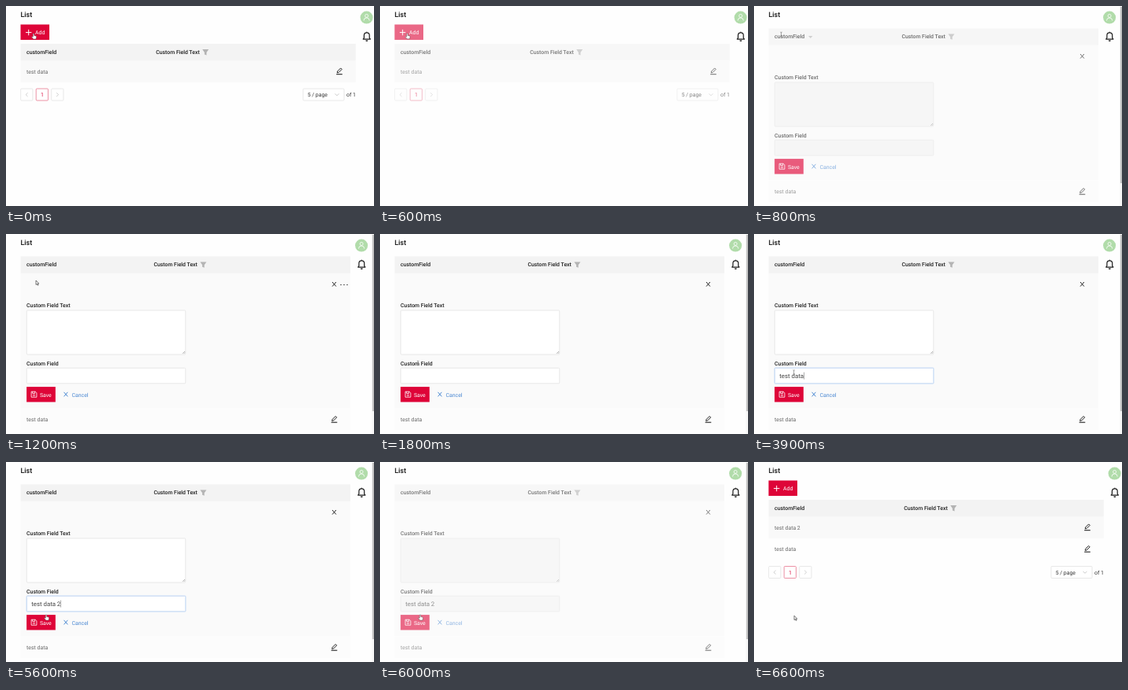
Write an HTML page that moves like this. It is 467 px wide and 254 px high and loops after 6.7 s.

```html
<!DOCTYPE html>
<html lang="en">
<head>
<meta charset="utf-8">
<title>List</title>
<style>
  html, body { margin: 0; width: 100%; height: 100%; overflow: hidden; background: #fefefe; }
  svg { display: block; width: 100%; height: 100%; }
  text { font: 400 6.9px Roboto, sans-serif; fill: #333; white-space: pre; text-rendering: geometricPrecision; }
  .bold { font-weight: 500; fill: #1c1c1c; }
  .title { font-size: 9px; font-weight: 500; fill: #111; }
  .row { fill: #666; }
  .white { fill: #fff; }
  .link { fill: #4a88d2; }
  .red { fill: #dc0a3c; }
  .typed { font-size: 7.8px; fill: #444; }
</style>
</head>
<body>
<svg id="stage" viewBox="0 0 467 254" xmlns="http://www.w3.org/2000/svg"></svg>
<script>
const LOOP = 6700, STEP = 100;
const RED = '#de0538', LINE = '#e2e2e2', BLUE = '#b3cdf0';

const rect = (x, y, w, h, fill, more = '') =>
  `<rect x="${x}" y="${y}" width="${w}" height="${h}" fill="${fill}" ${more}/>`;
const text = (x, y, s, cls = '') => `<text x="${x}" y="${y}" class="${cls}">${s}</text>`;
const line = (d, color, width = 0.9, more = '') =>
  `<path d="${d}" fill="none" stroke="${color}" stroke-width="${width}" ${more}/>`;
const group = (id, body) => `<g id="${id}">${body}</g>`;
const at = (x, y, body) => `<g transform="translate(${x} ${y})">${body}</g>`;
const box = (x, y, w, h, color = LINE, more = '') =>
  rect(x, y, w, h, '#fff', `rx="1" stroke="${color}" stroke-width=".8" ${more}`);
const cross = (x, y, r, color) => at(x, y,
  line(`M${-r} ${-r * 1.15}L${r} ${r * 1.15}M${r} ${-r * 1.15}L${-r} ${r * 1.15}`, color, 1));

const pencil = (x, y) => at(x, y,
  line('M-2.8 1.5l.5-1.9 4-4 1.5 1.5-4 4z', '#222', 1) + line('M-3.8 3.4h7.6', '#222', 1.1));
const funnel = (x, y) => at(x, y,
  '<path d="M-4-3.6h8L1.3.3v3.5l-2.6-1V.3z" fill="#b4b4b4"/>');

function header(y, width, textX) {
  return rect(18.5, y, width, 21.5, '#f3f3f3') +
    text(26.1, y + 12.7, 'customField', 'bold') +
    text(textX, y + 12.7, 'Custom Field Text', 'bold') +
    funnel(textX + 63, y + 10.6);
}

const pager =
  box(18.7, 105, 15.2, 15) + line('M27.6 110.2l-2.5 2.4 2.5 2.4', '#c4c4c4', 0.8) +
  box(38.2, 105, 15.2, 15, '#e7768f') + text(43.9, 115.1, '1', 'red') +
  box(57.7, 105, 15.2, 15) + line('M64.1 110.2l2.5 2.4-2.5 2.4', '#c4c4c4', 0.8) +
  box(377, 105, 52, 15) + text(382.7, 115, '5 / page') +
  line('M417.6 111.4l2.4 2.4 2.4-2.4', '#bcbcbc', 0.8) + text(432, 115, 'of 1');

const list =
  rect(18.5, 23.5, 36.5, 19.5, RED) +
  line('M25 33.6h7.4M28.7 29.9v7.4', '#fff', 1) + text(37, 36.4, 'Add', 'white') +
  header(48, 425.3, 190.2) +
  rect(18.5, 69.5, 425.3, 27.5, '#f9f9f9') +
  '<text id="first" x="26.1" y="85.6" class="row"></text>' + pencil(423, 83.3) +
  group('second', text(26.1, 113.1, 'test data', 'row') + pencil(423, 110.8)) +
  group('pager', pager);

const form =
  header(28.4, 418.5, 187.4) +
  group('sort', '<path d="M69 38h5.4l-2.7 3z" fill="#b8b8b8"/>') +
  rect(18.5, 49.9, 418.5, 171.2, '#fafafa') +
  rect(18.5, 221.1, 418.5, 27.9, '#fcfcfc') +
  cross(416.5, 63.8, 2.4, '#222') +
  group('dots', [425, 429, 433].map(x => `<circle cx="${x}" cy="64.6" r=".75" fill="#333"/>`).join('')) +
  text(26.1, 93, 'Custom Field Text', 'bold') +
  box(26.3, 97, 201.5, 56, LINE, 'id="area"') +
  line('M224.3 151.8l2.8-2.8M226 151.8l1.1-1.1', '#777', 0.6) +
  text(26.1, 166.5, 'Custom Field', 'bold') +
  rect(25.6, 169.5, 202.9, 21, 'none', 'id="glow" rx="1.5" stroke="#edf3fb" stroke-width="1"') +
  box(26.3, 170.2, 201.5, 19.6, LINE, 'id="field"') +
  '<text id="typed" x="32.3" y="183" class="typed"></text>' +
  rect(32.4, 175.6, 0.6, 9, '#777', 'id="caret"') +
  rect(26.1, 194.1, 36.7, 19.3, RED) +
  line('M32.1 200.2h5.2l1.6 1.6v5.4h-6.8zM33.7 200.2v2.2h3v-2.2', '#fff', 0.8) +
  '<circle cx="35.5" cy="204.8" r="1" fill="none" stroke="#fff" stroke-width=".7"/>' +
  text(42.9, 206.8, 'Save', 'white') +
  cross(75.9, 203.6, 2.4, '#4a88d2') + text(83.5, 206.8, 'Cancel', 'link') +
  text(26.1, 238, 'test data', 'row') + pencil(416.5, 235.8);

const sideIcons =
  '<circle cx="457.6" cy="14.6" r="8" fill="#b1dcaa"/>' +
  '<circle cx="457.6" cy="12.5" r="2" fill="none" stroke="#fff" stroke-width=".8"/>' +
  line('M454 18.6a3.6 3.6 0 0 1 7.2 0', '#fff', 0.8) +
  line('M453.2 42.1h9.2l-1.2-1.6v-3.2a3.4 3.4 0 0 0-6.8 0v3.2zM457.8 33.8v-1.1', '#1a1a1a', 1.2, 'stroke-linejoin="round"') +
  '<path d="M456.3 43.4h3a1.5 1.5 0 0 1-3 0z" fill="#1a1a1a"/>';

const pointers =
  group('arrow', '<path d="M0 0v5.4l1.3-1.1.9 1.9.9-.4-.9-1.8h1.6z" fill="#fff" stroke="#222" stroke-width=".6"/>') +
  group('beam', line('M-1.2-2.8h.8l.4.4.4-.4h.8M0-2.4v4.8M-1.2 2.8h.8l.4-.4.4.4h.8', '#666', 0.6)) +
  group('hand', '<path d="M-.7-1q.7-.7 1.4 0v2.4l2.2.5q.8.3.7 1.2l-.5 2.7h-3.4l-2.2-2.7q.2-1.1 1.8 0z" fill="#fff" stroke="#333" stroke-width=".4"/>');

document.getElementById('stage').innerHTML =
  text(18.4, 13.6, 'List', 'title') + group('list', list) + group('form', form) +
  group('side', sideIcons) +
  group('scroll', rect(464.3, 0, 2.7, 254, '#f7f7f7') + rect(464.8, 1, 2.2, 224, '#c2c2c2')) +
  group('pointer', pointers);

const el = {};
document.querySelectorAll('#stage [id]').forEach(n => el[n.id] = n);

const show = (node, on) => node.setAttribute('display', on ? 'inline' : 'none');
const within = (t, a, b) => t >= a && t < b;

// Linear interpolation through [time, value] points.
function track(points, t) {
  let prev = points[0];
  for (const p of points) {
    if (t < p[0]) return prev[1] + (p[1] - prev[1]) * (t - prev[0]) / (p[0] - prev[0]);
    prev = p;
  }
  return prev[1];
}

const pathX = [[0, 35], [700, 34.5], [800, 34.5], [1200, 38], [1500, 43], [1900, 50], [2100, 50.6], [5300, 50.6], [5600, 51]];
const pathY = [[0, 36.2], [700, 36], [800, 36], [1000, 50], [1200, 59], [1400, 84], [1500, 104], [1700, 148], [1900, 180], [2100, 177], [2200, 175.6], [5300, 175.6], [5600, 195.2]];
const listFade = [[0, 1], [100, 0.95], [600, 0.6], [6100, 0.6], [6500, 1]];
const formFade = [[800, 0.65], [900, 0.72], [1200, 1], [5700, 1], [6000, 0.6]];
const keys = [[2700, 1], [2800, 2], [2900, 4], [3000, 5], [3500, 6], [3600, 7], [3800, 8], [3900, 9], [4300, 10], [4500, 11]];
const ENTRY = 'test data 2';

function pointerKind(t) {
  if (t < 800 || within(t, 5500, 6100)) return 'hand';
  if (t < 1000 || within(t, 1500, 5500)) return 'beam';
  return 'arrow';
}

function draw(time) {
  const t = Math.floor(time % LOOP / STEP) * STEP;
  const editing = within(t, 800, 6100), saved = t >= 6100;

  show(el.list, !editing);
  show(el.form, editing);
  show(el.scroll, editing);
  el.list.setAttribute('opacity', track(listFade, t));
  el.form.setAttribute('opacity', track(formFade, t));
  el.side.setAttribute('transform', `translate(${editing ? -6.5 : 0} 0)`);

  el.first.textContent = saved ? ENTRY : 'test data';
  show(el.second, saved);
  el.pager.setAttribute('transform', `translate(0 ${saved ? 27.5 : 0})`);

  const locked = t < 1000 || t >= 5800;
  const focused = t >= 2000 && t < 5700;
  el.area.setAttribute('fill', locked ? '#f3f3f3' : '#fff');
  el.field.setAttribute('fill', locked ? '#f3f3f3' : '#fff');
  el.area.setAttribute('stroke', within(t, 1500, 1800) ? BLUE : LINE);
  el.field.setAttribute('stroke', focused || within(t, 1900, 2000) ? BLUE : LINE);
  show(el.glow, focused);
  show(el.sort, t < 1000);
  show(el.dots, within(t, 1100, 1400));

  const typedCount = keys.reduce((n, [when, count]) => t >= when ? count : n, 0);
  el.typed.textContent = ENTRY.slice(0, typedCount);
  const width = typedCount && editing ? el.typed.getComputedTextLength() : 0;
  el.caret.setAttribute('x', 32.4 + width);
  show(el.caret, focused && !within(t, 2400, 2700) && !within(t, 5000, 5500));

  el.pointer.setAttribute('transform', `translate(${track(pathX, t)} ${track(pathY, t)})`);
  const kind = pointerKind(t);
  for (const k of ['arrow', 'beam', 'hand']) show(el[k], k === kind);
}

const start = performance.now();
function tick() {
  draw(performance.now() - start);
  requestAnimationFrame(tick);
}
tick();
</script>
</body>
</html>
```
